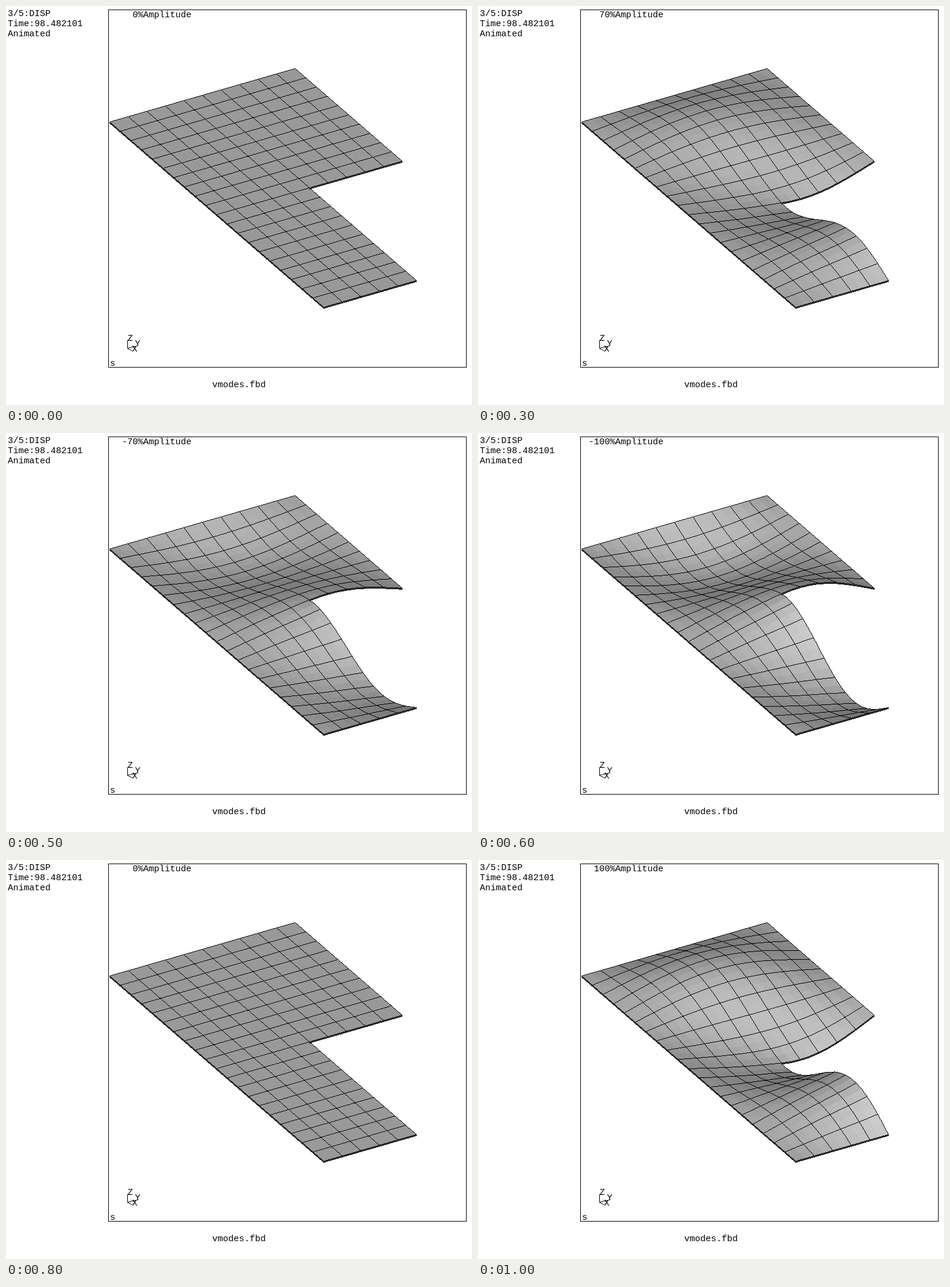
An HTML page with a canvas for the animation above (1100 ms loop, 784x672 px).

```html
<!DOCTYPE html>
<html lang="en">
<head>
<meta charset="utf-8">
<title>Plate mode</title>
<style>
  html, body { margin: 0; width: 100%; height: 100%; overflow: hidden; background: #fff; }
  svg, canvas { position: absolute; left: 0; top: 0; width: 784px; height: 672px; }
  path, rect { shape-rendering: crispEdges; }
  .line { fill: none; stroke: #000; stroke-width: 1; }
  text { font: 15px "Liberation Mono", monospace; fill: #000; white-space: pre; }
</style>
</head>
<body>
<svg viewBox="0 0 784 672" xmlns="http://www.w3.org/2000/svg">
  <rect class="line" x="172.5" y="6.5" width="602" height="602"/>
  <g id="plate"></g>
  <text x="3" y="17">3/5:DISP</text>
  <text x="3" y="34">Time:98.482101</text>
  <text x="3" y="51">Animated</text>
  <text id="label" x="312" y="19" text-anchor="end"></text>
  <text x="347" y="642">vmodes.fbd</text>
  <text x="175" y="606">s</text>
  <path class="line" d="M204.5 563V576.5L218 573M204.5 576.5L212 580.5"/>
  <text x="204.5" y="564">Z</text>
  <text x="217" y="573">Y</text>
  <text x="212" y="582">X</text>
</svg>
<canvas id="mesh" width="784" height="672"></canvas>
<script>
const start = performance.now();
const STEP_MS = 100, STEPS = 11;
const RISE = 31.2;            // pixels per unit of height, one unit being a cell side
const EDGE = 2;               // visible thickness in pixels
// Peak displacement in pixels at some points (u, v) of the free edges
const PEAKS = [[5, 10, -35], [6, 10, -40], [8, 10, -29], [5, 12, -22.5], [5, 16, 39], [5, 18, 31]];

// Third bending mode of an L-shaped plate, simply supported on its outer sides,
// from bicubic Hermite elements (4 x 8 lattice, one quadrant missing).
function solveMode() {
  const POISSON = 0.3, ROWS = 18;
  const hermite = [[1, 0, -3, 2], [0, 1, -2, 1], [0, 0, 3, -2], [0, 0, -1, 1]];
  const derive = c => c.slice(1).map((x, i) => x * (i + 1));
  const orders = [hermite, hermite.map(derive), hermite.map(c => derive(derive(c)))];
  const integral = (a, b) => {
    let sum = 0;
    a.forEach((x, i) => b.forEach((y, j) => { sum += x * y / (i + j + 1); }));
    return sum;
  };
  const table = (p, q) => orders[p].map(a => orders[q].map(b => integral(a, b)));
  const s00 = table(0, 0), s11 = table(1, 1), s22 = table(2, 2), s02 = table(0, 2), s20 = table(2, 0);

  const local = [...Array(16).keys()].map(k => [k >> 2, k & 3]);
  const index = new Map();
  const elements = [];
  for (let j = 0; j < 8; j++) {
    for (let i = 0; i < (j < 4 ? 4 : 2); i++) {
      elements.push(local.map(([a, b]) => {
        const col = 2 * i + a, row = 2 * j + b, key = col * ROWS + row;
        if (col === 0 || col === 8 || row === 0 || row === 16) return -1;
        if (!index.has(key)) index.set(key, index.size);
        return index.get(key);
      }));
    }
  }

  const n = index.size;
  const matrix = () => Array.from({ length: n }, () => new Float64Array(n));
  const stiff = matrix(), mass = matrix();
  for (const dofs of elements) {
    local.forEach(([a, b], r) => local.forEach(([c, d], s) => {
      const p = dofs[r], q = dofs[s];
      if (p < 0 || q < 0) return;
      stiff[p][q] += s22[a][c] * s00[b][d] + s00[a][c] * s22[b][d]
        + POISSON * (s20[a][c] * s02[b][d] + s02[a][c] * s20[b][d])
        + 2 * (1 - POISSON) * s11[a][c] * s11[b][d];
      mass[p][q] += s00[a][c] * s00[b][d];
    }));
  }

  const inverse = invert(stiff);
  const dot = (a, b) => a.reduce((sum, x, i) => sum + x * b[i], 0);
  const times = (m, x) => m.map(row => dot(row, x));
  const modes = [];
  for (let k = 0; k < 3; k++) {
    let x = Array.from({ length: n }, (_, i) => Math.sin(1 + i * i * (k + 1.3)));
    for (let pass = 0; pass < 50; pass++) {
      x = times(inverse, times(mass, x));
      for (const mode of modes) {
        const overlap = dot(x, times(mass, mode));
        x = x.map((value, i) => value - overlap * mode[i]);
      }
      const size = Math.sqrt(dot(x, times(mass, x)));
      x = x.map(value => value / size);
    }
    modes.push(x);
  }

  const shape = (c, t) => c[0] + t * (c[1] + t * (c[2] + t * c[3]));
  return (u, v) => {
    const x = u / 2.5, y = v / 2.5;
    const i = Math.max(0, Math.ceil(x) - 1), j = Math.max(0, Math.ceil(y) - 1);
    let sum = 0;
    for (const [a, b] of local) {
      const dof = index.get((2 * i + a) * ROWS + 2 * j + b);
      if (dof !== undefined) sum += modes[2][dof] * shape(hermite[a], x - i) * shape(hermite[b], y - j);
    }
    return sum;
  };
}

function invert(m) {
  const n = m.length;
  for (let k = 0; k < n; k++) {
    const pivot = m[k][k];
    m[k][k] = 1;
    for (let j = 0; j < n; j++) m[k][j] /= pivot;
    for (let i = 0; i < n; i++) {
      if (i === k) continue;
      const f = m[i][k];
      m[i][k] = 0;
      for (let j = 0; j < n; j++) m[i][j] -= f * m[k][j];
    }
  }
  return m;
}

// Least-squares scale of the mode to the peak displacements
function fitScale(mode) {
  let cross = 0, square = 0;
  for (const [u, v, peak] of PEAKS) {
    const w = mode(u, v);
    cross += w * peak / RISE;
    square += w * w;
  }
  return cross / square;
}

// Heights at half-cell spacing: i runs along the short side, j along the long one.
const mode = solveMode();
const scale = fitScale(mode);
const heights = Array.from({ length: 21 }, (_, i) =>
  Array.from({ length: 41 }, (_, j) => i > 10 && j > 20 ? 0 : scale * mode(i / 2, j / 2)));

const project = ([i, j], amp, drop = 0) => [
  174.5 + 15.6 * i + 9 * j,
  195.3 - 4.5 * i + 7.8 * j - RISE * amp * heights[i][j] + drop
];

function shade(i, j, amp) {
  const a = heights[i][j], b = heights[i + 1][j], c = heights[i + 1][j + 1], d = heights[i][j + 1];
  const du = amp * (b + c - a - d), dv = amp * (c + d - a - b);
  const facing = Math.max(0, (0.4325 * du - 0.749 * dv + 0.501) / Math.hypot(du, dv, 1));
  const gray = Math.round(106 + 60 * facing + 68 * facing * facing);
  return `rgb(${gray},${gray},${gray})`;
}

const plate = document.getElementById("plate");
const label = document.getElementById("label");
const ctx = document.getElementById("mesh").getContext("2d");
const fills = [];

function addFill(corners, color) {
  const node = document.createElementNS("http://www.w3.org/2000/svg", "path");
  plate.append(node);
  fills.push(amp => {
    const points = corners.map(([i, j, drop]) => project([i, j], amp, drop));
    node.setAttribute("d", "M" + points.map(p => p.map(x => x.toFixed(2)).join(" ")).join("L") + "Z");
    node.setAttribute("fill", color(amp));
  });
}

const row = (j, from, to) => Array.from({ length: to - from + 1 }, (_, k) => [from + k, j]);
const column = (i, to) => Array.from({ length: to + 1 }, (_, k) => [i, k]);

const gridLines = [];
for (let i = 0; i <= 20; i += 2) gridLines.push(column(i, i > 10 ? 20 : 40));
for (let j = 0; j <= 40; j += 2) gridLines.push(row(j, 0, j > 20 ? 10 : 20));
const rims = [column(0, 40), row(40, 0, 10), row(20, 10, 20)];

// Facets from back to front, then the visible sides
for (let j = 0; j < 40; j++) {
  for (let i = j < 20 ? 19 : 9; i >= 0; i--) {
    addFill([[i, j], [i + 1, j], [i + 1, j + 1], [i, j + 1]], amp => shade(i, j, amp));
  }
}
for (const rim of rims) {
  addFill([...rim, ...rim.slice().reverse().map(([i, j]) => [i, j, EDGE])], () => "#444");
}

// One pixel per step of the longer axis, without smoothing
function drawSegment(p, q) {
  const major = Math.abs(q[0] - p[0]) >= Math.abs(q[1] - p[1]) ? 0 : 1, minor = 1 - major;
  const [a, b] = p[major] <= q[major] ? [p, q] : [q, p];
  const slope = (b[minor] - a[minor]) / (b[major] - a[major]);
  for (let s = Math.ceil(a[major] - 0.5); s + 0.5 <= b[major]; s++) {
    const t = Math.floor(a[minor] + slope * (s + 0.5 - a[major]));
    if (major === 0) ctx.fillRect(s, t, 1, 1);
    else ctx.fillRect(t, s, 1, 1);
  }
}

function drawLine(nodes, amp, drop = 0) {
  const points = nodes.map(node => project(node, amp, drop));
  for (let k = 1; k < points.length; k++) drawSegment(points[k - 1], points[k]);
}

let shown = -1;
function render(time) {
  const step = Math.floor(Math.max(0, time) / STEP_MS) % STEPS;
  if (step === shown) return;
  shown = step;
  const amp = Math.sin(step * Math.PI / 4);
  fills.forEach(update => update(amp));
  ctx.clearRect(0, 0, 784, 672);
  gridLines.forEach(line => drawLine(line, amp));
  rims.forEach(rim => drawLine(rim, amp, EDGE));
  label.textContent = `${Math.trunc(Number((100 * amp).toFixed(6)))}%Amplitude`;
}

function tick() {
  render(performance.now() - start);
  requestAnimationFrame(tick);
}
tick();
</script>
</body>
</html>
```
